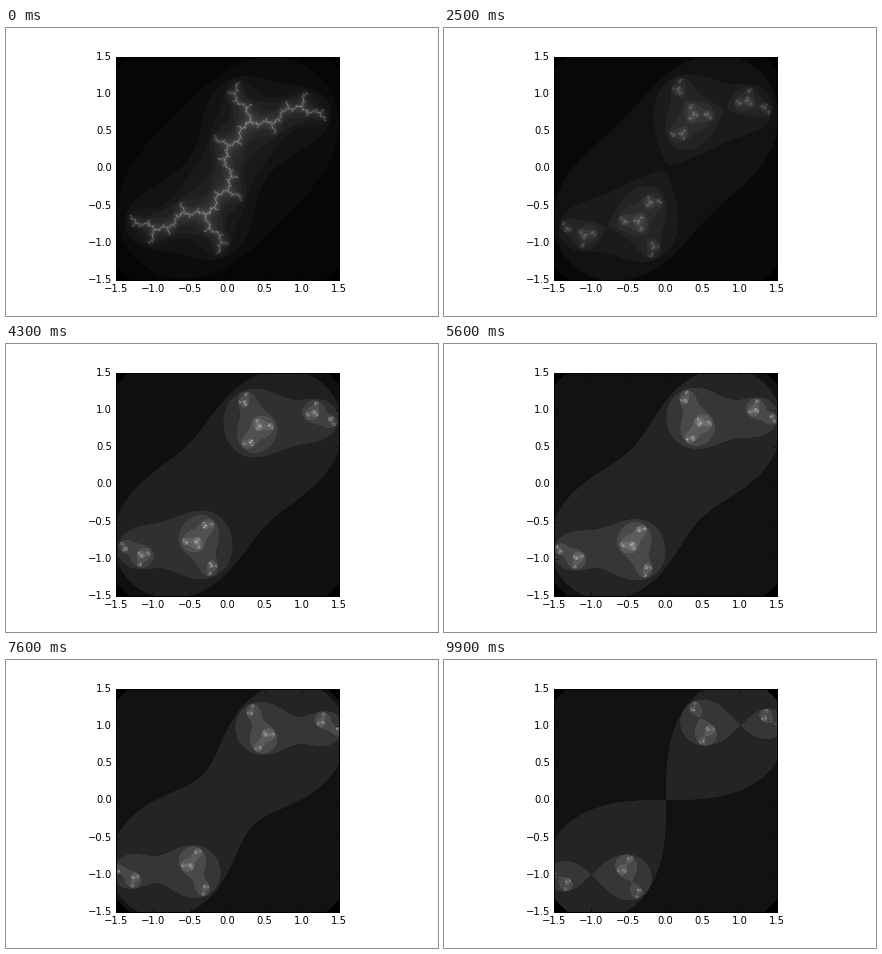
A matplotlib script that plays this animation: 432 px wide and 288 px high, repeating every 10 s.

```python
import numpy as np
import matplotlib.pyplot as plt
from matplotlib.animation import FuncAnimation

FRAMES = 100
INTERVAL = 100
LIMIT = 1.5
HALF_SIDE = 400
MAX_ITER = 40

plt.style.use("classic")
plt.rcParams.update({
    "font.family": "DejaVu Sans",
    "font.size": 10,
    "figure.dpi": 72,
    "savefig.dpi": 72,
    "figure.facecolor": "white",
    "savefig.facecolor": "white",
    "figure.subplot.left": 0.125,
    "figure.subplot.right": 0.9,
    "figure.subplot.bottom": 0.125,
    "figure.subplot.top": 0.9,
})

# The set is symmetric under z -> -z, so half of the grid is enough.
axis = np.arange(-HALF_SIDE, HALF_SIDE + 1) / HALF_SIDE * LIMIT
side = axis.size
plane = (axis[None, :] + 1j * axis[:, None]).ravel()[:side * side // 2 + 1]
start = np.flatnonzero(plane.real ** 2 + plane.imag ** 2 <= 4)
z_start = plane[start]


def escape_counts(c):
    """Number of steps of z -> z*z + c before |z| exceeds 2."""
    counts = np.zeros(plane.size, dtype=np.float32)
    idx, z = start, z_start
    for n in range(1, MAX_ITER + 1):
        counts[idx] = n
        z = z * z + c
        keep = z.real ** 2 + z.imag ** 2 <= 4
        idx, z = idx[keep], z[keep]
        if not idx.size:
            break
    return np.concatenate([counts, counts[-2::-1]]).reshape(side, side)


fig, ax = plt.subplots(figsize=(6, 4))
image = ax.imshow(
    np.zeros((side, side), dtype=np.float32),
    cmap="gray",
    origin="lower",
    extent=(-LIMIT, LIMIT, -LIMIT, LIMIT),
    interpolation="bilinear",
)
ticks = np.linspace(-LIMIT, LIMIT, 7)
ax.set_xticks(ticks)
ax.set_yticks(ticks)


def update(frame):
    c = -1j * (1 + frame / (FRAMES - 1))
    counts = escape_counts(c)
    image.set_data(counts)
    image.set_clim(0, counts.max())
    return (image,)


anim = FuncAnimation(fig, update, frames=FRAMES, interval=INTERVAL,
                     repeat=True, repeat_delay=0, blit=False)
plt.show()
```
